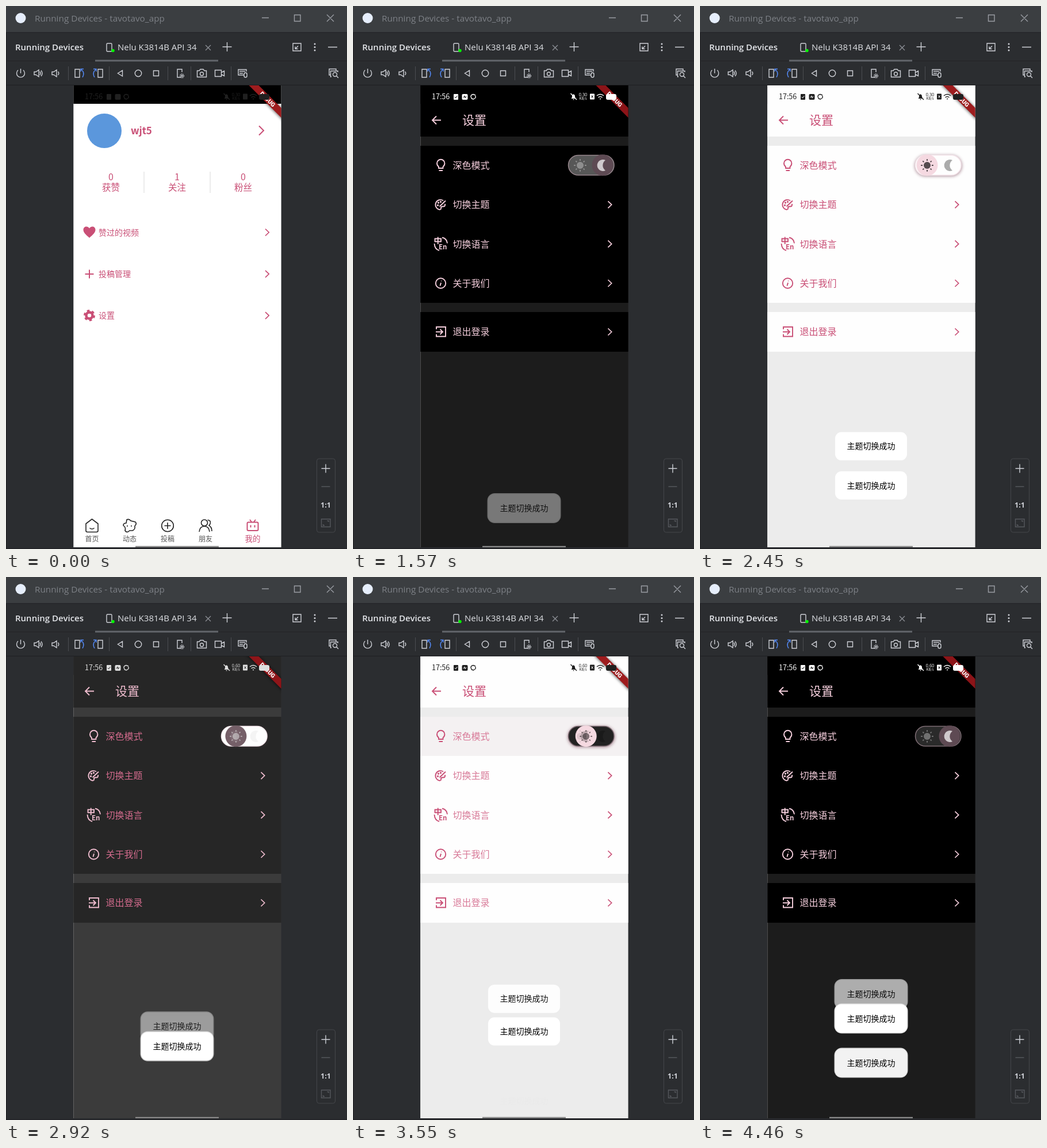
An HTML page for the animation above (4530 ms loop, 593 px wide and 944 px high).

```html
<!DOCTYPE html>
<html lang="zh">
<head>
<meta charset="utf-8">
<title>Theme switch</title>
<style>
html, body { margin: 0; width: 100%; height: 100%; overflow: hidden; background: #2b2d30; }
svg { display: block; width: 593px; height: 944px; }
text { font-family: "Noto Sans CJK SC", "Noto Sans CJK", "Noto Sans", sans-serif; }
.ide text { font-family: "Open Sans", "Noto Sans", sans-serif; }
.line { fill: none; stroke-width: 1.4; }
.ide .line { stroke: #ced0d6; }
.pink { fill: #c94f76; }
.pinkline { fill: none; stroke: #c94f76; stroke-width: 2; }
.mid { text-anchor: middle; }
.icon { fill: none; stroke: var(--icon); stroke-width: 1.9; }
.iconfill { fill: var(--icon); stroke: none; }
.label { fill: var(--text); font-size: 16px; font-weight: 500; }
.status { fill: var(--status); }
.statusline { fill: none; stroke: var(--status); stroke-width: 1.4; }
.card { fill: var(--card); }
.glyph { fill: var(--glyph); stroke: var(--glyph); }
</style>
</head>
<body>
<svg viewBox="0 0 593 944">
  <defs>
    <clipPath id="screen"><rect x="117.300" y="138" width="361.300" height="803"/></clipPath>
    <filter id="blur" x="-30%" y="-100%" width="160%" height="300%"><feGaussianBlur stdDeviation="2.4"/></filter>
    <path id="chevron" d="M-3.5-6 2.7 0-3.5 6"/>
    <path id="moon" stroke="none" d="M6-9A10 10 0 1 0 6 9A11 11 0 0 1 6-9Z"/>
    <g id="sun"><circle r="6" stroke="none"/><path id="rays" fill="none" stroke-width="2"/></g>
  </defs>

  <g class="ide">
    <path d="M0 0H593V46H0Z" fill="#3b3e41"/>
    <path d="M0 46H593M0 137.5H593M.5 46V944M0 943H593" stroke="#1e1f22"/>
    <path d="M0 95.5H593" stroke="#232427"/>
    <circle cx="25.500" cy="21" r="9" fill="#e6eefc"/>
    <text x="50" y="26.500" font-size="15.300" fill="#7d8086">Running Devices - tavotavo_app</text>
    <path class="line" style="stroke:#9a9da3" d="M445 20.500H457M501.500 15.500H512V26.500H501.500ZM558 15 570 27M570 15 558 27"/>
    <text x="16" y="77" font-size="15" font-weight="600" fill="#e4e6ea">Running Devices</text>
    <text x="194" y="77" font-size="15" fill="#dfe1e5">Nelu K3814B API 34</text>
    <rect class="line" x="175" y="65" width="9" height="14" rx="1.500"/>
    <circle cx="186" cy="77.500" r="2.700" fill="#0f0"/>
    <path d="M155 95H369" stroke="#63666b" stroke-width="3"/>
    <path class="line" style="stroke:#8b8e94" d="M347 68 356 77M356 68 347 77"/>
    <path class="line" d="M376.500 71H392.500M384.500 63V79M560 71.500H576M499 65H513V78H499ZM508 69.500 503 74.500M503 70.500V74.500H507.500"/>
    <g fill="#ced0d6"><circle cx="537" cy="66" r="1.500"/><circle cx="537" cy="71.500" r="1.500"/><circle cx="537" cy="77" r="1.500"/></g>
    <path d="M108.500 105V129M179.500 105V129M281.500 105V129M321.500 105V129M391.500 105V129" stroke="#4b4d51"/>
    <g class="line">
      <path d="M25.500 109V117M21 111.500A7 7 0 1 0 30 111.500"/>
      <path d="M49 114.500H52L57 111V123L52 119.500H49ZM59 114Q61 117 59 120M61 112Q65 117 61 122"/>
      <path d="M80 114.500H83L88 111V123L83 119.500H80ZM90.500 114Q93 117 90.500 120"/>
      <path d="M120 110H128V124H120ZM168 110H160V124H168Z"/>
      <path style="stroke:#548af7" d="M130 110Q138 115 133 124M130 114V109.500H135M157 110Q149 115 154 124M157 114V109.500H152"/>
      <path d="M202.500 112V122L194.500 117ZM256.500 112.500H265.500V121.500H256.500Z"/>
      <circle cx="230" cy="117" r="5.700"/>
      <path d="M304 124H298V110H306V115"/><circle cx="306" cy="121.500" r="3.200" stroke-dasharray="1.800 .8"/><circle cx="306" cy="121.500" r="1"/>
      <path d="M332.500 112.500H336L338 110H343L345 112.500H348.500V123.500H332.500Z"/><circle cx="340.500" cy="118" r="3"/>
      <path d="M363.500 111.500H374.500V122.500H363.500ZM374.500 115.500 379.500 113V121.500L374.500 119"/>
      <path d="M414 120H404V110.500H418V114M406 113.500H416M406 117H412"/><rect x="414" y="116" width="5" height="8" rx="2.500"/>
      <path d="M564 120H562V109.500H574V112M566 123H564.500V113H577V115"/><circle cx="572" cy="119" r="3.500"/><path d="M574.500 121.500 578 125"/>
    </g>
    <rect x="540.500" y="787" width="32" height="128" rx="4" fill="none" stroke="#45474b"/>
    <path class="line" d="M548.500 804H563.500M556 796.500V811.500"/>
    <path class="line" style="stroke:#56585d" d="M548.500 835.500H563.500M548.500 892H564V905.500H548.500ZM551.500 901V903H554M561 897V895H558.500"/>
    <text class="mid" x="556" y="872" font-size="12.500" font-weight="700" fill="#ced0d6">1:1</text>
  </g>

  <g id="phone" clip-path="url(#screen)">
    <g id="profile">
      <path d="M117 138H479V941H117Z" fill="#fff"/>
      <path d="M117 138H479V170H117Z"/>
      <circle cx="171" cy="217" r="30" fill="#5b97dc"/>
      <text class="pink" x="217" y="223" font-size="17" font-weight="700">wjt5</text>
      <path class="pinkline" d="M440 208.500 448 216.500 440 224.500"/>
      <path d="M240 288V325M355 288V325" stroke="#d8d8d8"/>
      <g id="stats" class="pink mid"></g>
      <g id="entries"></g>
      <path class="pink" d="M145 403C138 397 134.500 393.500 134.500 389C134.500 383 142 381.500 145 386.500C148 381.500 155.500 383 155.500 389C155.500 393.500 152 397 145 403Z"/>
      <path class="pinkline" d="M137.500 466H152.500M145 458.500V473.500"/>
      <g class="pinkline"><circle cx="145" cy="538" r="5.500" stroke-width="4.500"/><circle cx="145" cy="538" r="8.500" stroke-width="3" stroke-dasharray="4.500 4.400"/></g>
      <g class="line" stroke="#222" style="stroke-width:1.6">
        <path d="M139 900 149.500 892 160 900V912Q160 914.500 157.500 914.500H141.500Q139 914.500 139 912ZM145.500 907.500Q149.500 911 153.500 907.500"/>
        <path d="M210 893Q214 891 217 895L225 897Q228 900 224 904Q225 910 220 912L215 912Q210 917 207 912Q209 907 204 903Q204 899 209 899ZM211 903V905M218 903V905"/>
        <circle cx="281" cy="903.500" r="10.300"/><path d="M275.500 903.500H286.500M281 898V909"/>
        <circle cx="345" cy="898.500" r="5.500"/><path d="M336 914Q337 904.500 345 904.500Q353 904.500 354 914M350.500 893.500Q357 894 355 900.500L353 903Q358 906 358 913"/>
      </g>
      <path class="pinkline" d="M421.500 897.500H436.500Q438.500 897.500 438.500 899.500V910Q438.500 912 436.500 912H421.500Q419.500 912 419.500 910V899.500Q419.500 897.500 421.500 897.500ZM424 893 427 897M434 893 431 897M425.500 902.500V906.500M432.500 902.500V906.500"/>
      <g id="nav" class="mid"></g>
    </g>

    <g id="settings">
      <path d="M117 138H479V941H117Z" fill="var(--back)"/>
      <path class="card" d="M117 138H479V227H117ZM117 243H479V516H117ZM117 532H479V601H117Z"/>
      <path id="ripple" d="M117 243H479V311H117Z" fill="#7a5a6a"/>
      <path class="icon" d="M153 198.500H138.500M145 191.500 138 198.500 145 205.500"/>
      <text class="iconfill" x="190" y="205.500" font-size="21">设置</text>
      <g id="rows"></g>
      <g class="icon">
        <path d="M149 282V279.500Q146 277 146 273.500A6.700 6.700 0 0 1 159.400 273.500Q159.400 277 156.500 279.500V282ZM149.500 286H156"/>
        <path d="M157 338.500A8.600 8.600 0 1 0 150.500 354Q153.500 354 153 351Q153 348.500 156 348.500H158Q160.500 348 160 344M150.500 348.500 161 338.500"/>
        <circle cx="147.500" cy="346.500" r=".7"/><circle cx="148.500" cy="342" r=".7"/><circle cx="152.500" cy="340.500" r=".7"/>
        <path d="M155 402.500Q163 404 164 412.500M141.500 413Q142 423 150 425M142.500 404.500H153V409.500H142.500ZM147.700 401.500V414"/>
        <circle cx="152.500" cy="482" r="8.700"/><path d="M153 481 151.500 486.500M153.700 477.500V478.500"/>
        <path d="M145 562V558H161V574.500H145V570.500M144 566.500H155.500M151.500 562 156 566.500 151.500 571"/>
      </g>
      <text class="iconfill" x="149" y="423" font-size="11.500" font-weight="700">En</text>
      <rect id="glow" x="373" y="259" width="83" height="37.500" rx="18.500" fill="#8c6070" filter="url(#blur)"/>
      <rect id="track" x="374.500" y="259.500" width="79.500" height="34.500" rx="17.200" stroke-width="1.500"/>
      <circle id="knob" cy="276.700" r="18.500"/>
      <g class="glyph">
        <use id="sunRest" href="#sun" x="395" y="277"/>
        <use id="moonRest" href="#moon" x="433" y="277"/>
        <use id="sunKnob" href="#sun" y="277"/>
        <use id="moonKnob" href="#moon" y="277"/>
      </g>
    </g>

    <g id="toasts"></g>
    <path d="M225 940H370" stroke="#8a8a8a" stroke-width="2.500"/>
    <g transform="translate(455 162) rotate(45)">
      <path d="M-60-6H60V7H-60Z" opacity=".6" filter="url(#blur)"/>
      <path id="band" d="M-60-6H60V6H-60Z"/>
      <text class="mid" y="3.700" font-size="10.200" font-weight="900" fill="#fff" style="font-family:Roboto,sans-serif">DEBUG</text>
    </g>

    <text class="status" x="137" y="161.500" font-size="12.500" font-weight="500">17:56</text>
    <g class="status">
      <rect x="175" y="153" width="8" height="10" rx="1"/><rect x="189.500" y="153" width="10" height="10" rx="2"/>
      <path d="M379.500 161Q381 160 381 156Q383.500 150.500 386 156Q386 160 387.500 161ZM382 162H385L383.500 163.500Z"/>
      <rect x="412" y="152.500" width="8" height="10" rx="1"/><rect x="440" y="153" width="18" height="10" rx="3"/>
      <text class="mid" id="speed" x="400" y="156.500" font-size="7.500" font-weight="500"></text>
      <text class="mid" x="400" y="163" font-size="6" font-weight="500">KB/s</text>
    </g>
    <path class="statusline" d="M378.500 152 389 163M424 156Q430 151 436 156M426.500 159Q430 156 433.500 159M429 161.500H431M206 160Q203 155 209 153.500L213 155M212.500 156Q215 160 209 162L205.500 160.500"/>
    <path id="cutouts" d="M177 158 178.500 160 181.500 156M192 159.500 194 156 195 160 197 157M414.500 155.500 417.500 159.500M417.500 155.500 414.500 159.500" fill="none" stroke="var(--card)"/>
  </g>
</svg>
<script>
const LOOP = 4530;
const TAPS = [1262, 1970, 2830, 3358, 4065];
const SLOT = 68.5;
const $ = id => document.getElementById(id);
const clamp = v => Math.min(1, Math.max(0, v));
const ramp = (t, from, to) => clamp((t - from) / (to - from));
const easeOut = (v, power) => 1 - (1 - v) ** power;
const smooth = v => v * v * (3 - 2 * v);
const mix = (a, b, v) => `rgb(${a.map((c, i) => Math.round(c + (b[i] - c) * v))})`;
const gray = v => [v, v, v];
const ROSE = [201, 79, 118], BLUSH = [246, 207, 221];

$('rays').setAttribute('d', Array.from({ length: 8 }, (_, i) => {
  const c = Math.cos(i * Math.PI / 4), s = Math.sin(i * Math.PI / 4);
  return `M${8 * c} ${8 * s}L${10.8 * c} ${10.8 * s}`;
}).join(''));

$('stats').innerHTML = [['0', '获赞'], ['1', '关注'], ['0', '粉丝']].map(([n, name], i) =>
  `<text x="${182.5 + i * 115}" y="302.5" font-size="16">${n}</text>
   <text x="${182.5 + i * 115}" y="321" font-size="15.500">${name}</text>`).join('');

$('entries').innerHTML = ['赞过的视频', '投稿管理', '设置'].map((name, i) => {
  const y = 393.5 + i * 72.3;
  return `<text class="pink" x="161" y="${y + 5}" font-size="14" font-weight="500">${name}</text>
    <use class="pinkline" style="stroke-width:1.700" href="#chevron" x="454.500" y="${y}"/>`;
}).join('');

$('nav').innerHTML = [['首页', 149.5], ['动态', 215], ['投稿', 281], ['朋友', 347], ['我的', 429]].map(([name, x], i) =>
  `<text x="${x}" y="930.500" font-size="${i === 4 ? 13.5 : 12}" fill="${i === 4 ? '#c94f76' : '#555'}">${name}</text>`).join('');

$('rows').innerHTML = [['深色模式', 277], ['切换主题', 345.3], ['切换语言', 413.7], ['关于我们', 482], ['退出登录', 566.5]].map(([name, y], i) =>
  `<text class="label" x="173.500" y="${y + 5.8}">${name}</text>` +
  (i ? `<use class="icon" style="stroke-width:1.700" href="#chevron" x="447" y="${y}"/>` : '')).join('');

$('toasts').innerHTML = TAPS.map(() =>
  `<g><rect x="-64" y="-26" width="128" height="52" rx="13" fill="#e4e4e4"/>
   <rect x="-62.500" y="-24.500" width="125" height="49" rx="11" fill="#fff"/>
   <text class="mid" y="5" font-size="14" font-weight="500">主题切换成功</text></g>`).join('');
const toasts = [...$('toasts').children];

function drawToasts(t, dark) {
  toasts.forEach((toast, i) => {
    const age = t - TAPS[i];
    const shown = Math.min(ramp(age, 185, 430), 1 - ramp(age, 1540, 1820));
    const lift = TAPS.slice(i + 1).reduce((sum, tap) => sum + easeOut(ramp(t - tap, 40, 575), 3), 0);
    const y = 833.5 - SLOT * lift + 80 * (1 - shown);
    toast.setAttribute('transform', `translate(297.500 ${y})`);
    toast.setAttribute('opacity', Math.min(1, 1.2 * shown ** 1.6));
    toast.firstElementChild.setAttribute('opacity', dark);
  });
}

function drawToggle(age, dark, toward) {
  const k = toward(smooth(ramp(age, 40, 270)));
  const track = toward(easeOut(ramp(age, 210, 540), 4));
  const x = 395 + 39 * k;
  $('track').setAttribute('fill', mix(gray(254), gray(34), track));
  $('track').setAttribute('stroke', mix([246, 232, 237], [122, 104, 111], track));
  $('glow').setAttribute('opacity', 0.6 * (1 - dark));
  $('knob').setAttribute('cx', x);
  $('knob').setAttribute('fill', mix([245, 217, 225], [94, 74, 83], dark));
  $('sunKnob').setAttribute('x', x);
  $('moonKnob').setAttribute('x', x - 1);
  // Translucent glyphs: faint on the track, stronger on the knob.
  $('sunRest').setAttribute('opacity', 0.33 * k);
  $('moonRest').setAttribute('opacity', 0.33 * (1 - k));
  $('sunKnob').setAttribute('opacity', 0.65 * (1 - k));
  $('moonKnob').setAttribute('opacity', 0.7 * k);
}

function draw(t) {
  const last = TAPS.filter(tap => tap <= t).length - 1;
  const age = last < 0 ? 1e4 : t - TAPS[last];
  const toward = v => last % 2 === 0 ? v : 1 - v;
  const dark = last < 0 ? 0 : toward(ramp(age, 0, 107));
  const text = last < 0 ? 0 : toward(ramp(age, 40, 270));
  const vars = {
    icon: mix(ROSE, BLUSH, dark), text: mix(ROSE, BLUSH, text),
    status: mix(gray(32), gray(255), dark), glyph: mix(gray(0), gray(255), dark),
    card: mix(gray(254), gray(0), dark), back: mix(gray(236), gray(28), dark)
  };
  for (const name in vars) $('phone').style.setProperty('--' + name, vars[name]);

  const enter = easeOut(ramp(t, 120, 620), 3);
  $('profile').setAttribute('transform', `translate(${-120 * enter} 0)`);
  $('settings').setAttribute('transform', `translate(${362 * (1 - enter)} 0)`);
  $('cutouts').setAttribute('opacity', enter);
  $('speed').textContent = t < 2700 ? '0.30' : '0.60';
  $('ripple').setAttribute('opacity', 0.08 * Math.sin(Math.PI * ramp(age, 90, 300)));
  $('band').setAttribute('fill', mix([158, 28, 30], [140, 20, 24], dark));
  drawToggle(age, dark, last < 0 ? () => 0 : toward);
  drawToasts(t, dark);
}

const start = performance.now();
function tick() {
  draw((performance.now() - start) % LOOP);
  requestAnimationFrame(tick);
}
tick();
</script>
</body>
</html>
```
